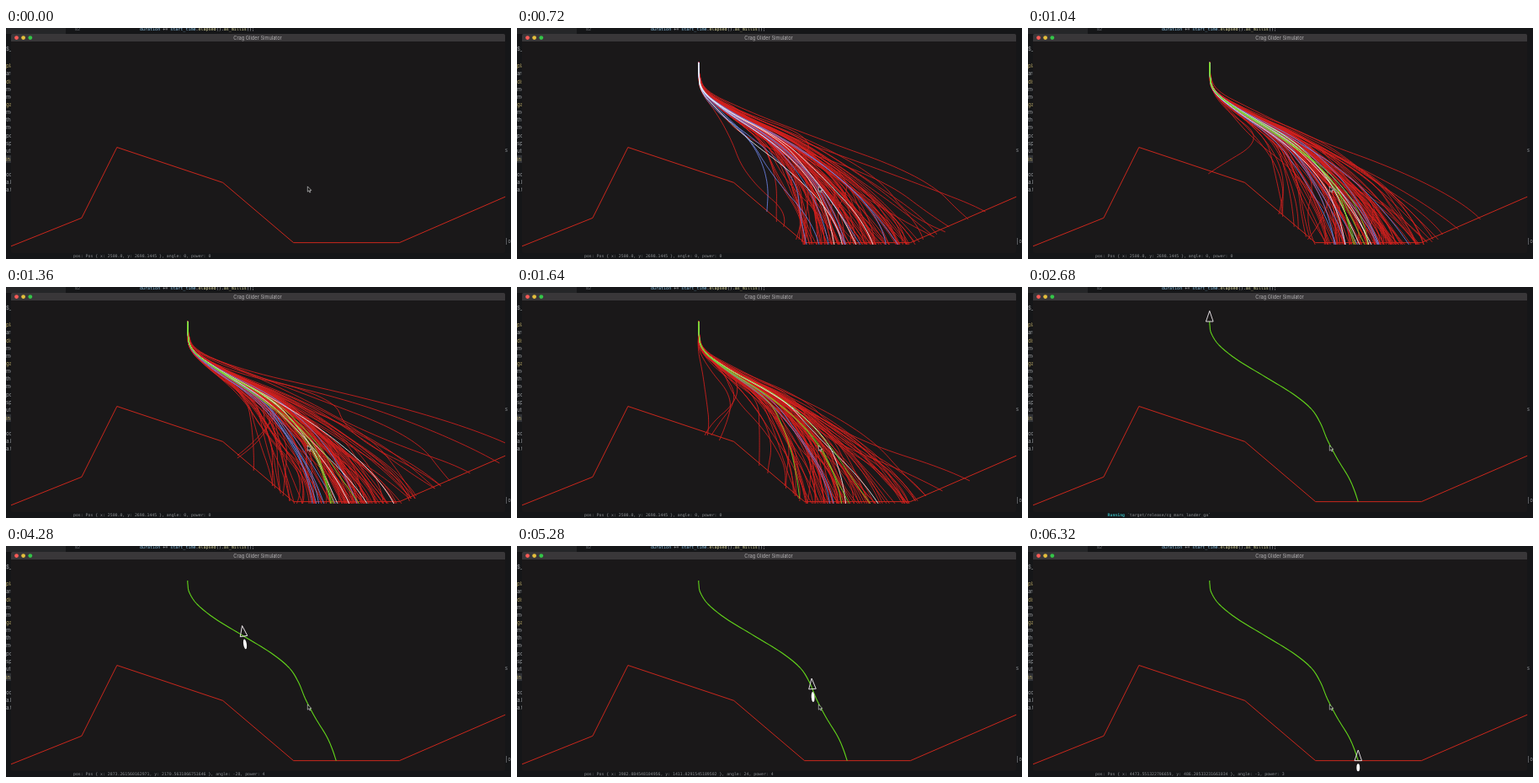
Animation of 600x274 px, one loop 6.36 s. Source, as an HTML page:

```html
<!DOCTYPE html>
<html lang="en">
<head>
<meta charset="utf-8">
<title>Crag Glider Simulator</title>
<style>
  html, body { margin: 0; width: 100%; height: 100%; overflow: hidden; background: #151618; }
  svg { display: block; width: 100vw; height: 100vh; }
  text { white-space: pre; }
  .mono { font-family: "DejaVu Sans Mono", "Liberation Mono", monospace; }
  .ui { font-family: Inter, "Liberation Sans", sans-serif; }
  .line { fill: none; stroke-linejoin: round; }
</style>
</head>
<body>
<svg viewBox="0 0 600 274" preserveAspectRatio="none">
  <rect width="600" height="274" fill="#151618"/>
  <rect width="71" height="7" fill="#252628"/>
  <g class="mono" font-size="5.02">
    <text x="82" y="3.4" fill="#70747a">82</text>
    <text x="159" y="3.4" fill="#c8ccd2"><tspan fill="#8fc7e8">duration</tspan> += <tspan fill="#8fc7e8">start_time</tspan>.<tspan fill="#d8d59a">elapsed</tspan>().<tspan fill="#d8d59a">as_millis</tspan>();</text>
  </g>
  <rect y="151" width="6" height="9" fill="#303236"/>
  <g id="sidebar" class="ui" font-size="6"></g>
  <g class="ui" font-size="5.5" fill="#9a9ca0">
    <text x="593" y="147">s</text>
    <text x="596.5" y="255">o</text>
  </g>
  <path d="M594.5 249v8" stroke="#77797d" stroke-width=".7"/>
  <rect x="6" y="7" width="587" height="260" rx="2" fill="#1a1819"/>
  <path d="M6 16V9q0-2 2-2H591q2 0 2 2V16z" fill="#393739"/>
  <circle cx="12.5" cy="11.6" r="2.4" fill="#fc5b57"/>
  <circle cx="20.6" cy="11.6" r="2.4" fill="#e5bf3c"/>
  <circle cx="28.8" cy="11.6" r="2.4" fill="#34c648"/>
  <text class="ui" x="299" y="13.7" font-size="5.7" text-anchor="middle" fill="#b6b4b6">Crag Glider Simulator</text>
  <path id="terrain" class="line" stroke="#cb271c"/>
  <g id="population" class="line" stroke-width=".85">
    <path stroke="#d3211e"/>
    <path stroke="#6d84e6"/>
    <path stroke="#f2f2f6"/>
    <path stroke="#74d824"/>
  </g>
  <path id="route" class="line" stroke="#62d51a" stroke-width="1.1"/>
  <g id="ship">
    <path d="M0-12.6L4.3 0H-4.3z" fill="none" stroke="#f4eef2" stroke-width=".9"/>
    <ellipse id="flame" rx="1.9" fill="#fff"/>
  </g>
  <path d="M358.3 187.9v6.3l1.5-1.3 1 2.2 1-.4-1-2.2h2z" fill="#111" stroke="#e6e6e6" stroke-width=".6"/>
  <text class="mono" x="80" y="271.8" font-size="4.85" fill="#8b8d90"><tspan id="verb" fill="#36b0b4" font-weight="bold"></tspan><tspan id="status"></tspan></text>
</svg>
<script>
const LOOP = 6360, STEP = 40, SEARCH_END = 2640, FLIGHT = 3160, LAST = 79;
const LOG_LAG = 8;
const $ = id => document.getElementById(id);
const lerp = (a, b, s) => a + (b - a) * s;
const clamp = (v, lo, hi) => Math.min(hi, Math.max(lo, v));
const px = x => 6 + x * 0.0839;
const py = y => 267.2 - y * 0.0838;

// Piecewise linear lookup in [key, value] pairs
function ramp(points, v) {
  if (v <= points[0][0]) return points[0][1];
  for (let i = 1; i < points.length; i++) {
    const [a, p] = points[i - 1], [b, q] = points[i];
    if (v <= b) return lerp(p, q, (v - a) / (b - a));
  }
  return points[points.length - 1][1];
}

const ground = [[0, 100], [1000, 500], [1500, 1500], [3000, 1000], [4000, 150], [5500, 150], [6999, 800]]
  .map(([x, y]) => [px(x), py(y)]);
$("terrain").setAttribute("d", "M" + ground.join("L"));

const labels = [[27, "$_i"], [47, "pla", 1], [56, "arg"], [66, "dis", 1], [75, "mo"], [84, "mo"], [93, "ga", 1],
  [102, "mo"], [111, "the"], [120, "mo"], [130, "po"], [139, "sp"], [148, "uti"], [158, "in", 1],
  [176, "oc"], [185, "a.lo"], [194, "a.to"]];
$("sidebar").innerHTML = labels.map(([y, s, hot]) =>
  `<text x="0" y="${y}" fill="${hot ? "#b9a765" : "#a0a2a6"}">${s}</text>`).join("");

// Flight plan: step, world x, world y, angle
const plan = [
  [0, 2500, 2700, 0], [5, 2503, 2646, -45], [10, 2524, 2532, -60], [15, 2634, 2365, -50],
  [20, 2873.261560162971, 2170.5631866751644, -28], [28, 3296, 1912, 9], [36, 3676, 1678, 25],
  [43, 3933, 1470, 28], [50, 4070, 1261, 15], [57, 4166, 1029, -10], [64, 4303, 766, -15],
  [71, 4473.551322706659, 486.20533231661034, -1], [75, 4547, 319, 4], [79, 4604, 150, 0]
];
const angles = plan.map(p => [p[0], p[3]]);

function tangent(i, axis) {
  const a = plan[Math.max(0, i - 1)], b = plan[Math.min(plan.length - 1, i + 1)];
  return (b[axis] - a[axis]) / (b[0] - a[0]);
}

function hermite(k, axis) {
  let i = 0;
  while (i < plan.length - 2 && k >= plan[i + 1][0]) i++;
  const a = plan[i], b = plan[i + 1], h = b[0] - a[0], s = (k - a[0]) / h;
  const w = s * s * (3 - 2 * s);
  return a[axis] * (1 - w) + b[axis] * w
    + h * s * (1 - s) * ((1 - s) * tangent(i, axis) - s * tangent(i + 1, axis));
}

const shipAt = k => ({
  x: hermite(k, 1),
  y: hermite(k, 2),
  angle: Math.round(ramp(angles, k)),
  power: k >= 68 ? 3 : Math.min(4, k)
});

const route = [];
for (let k = 0; k <= LAST; k++) {
  const p = shipAt(k);
  route.push(px(p.x).toFixed(2) + " " + py(p.y).toFixed(2));
}
$("route").setAttribute("d", "M" + route.join("L"));

function random(seed) {
  let s = Math.imul(seed + 1, 2654435761) >>> 0;
  return () => {
    s = (s + 0x6D2B79F5) >>> 0;
    let v = Math.imul(s ^ s >>> 15, 1 | s);
    v ^= v + Math.imul(v ^ v >>> 7, 61 | v);
    return ((v ^ v >>> 14) >>> 0) / 4294967296;
  };
}

// Sideways drift per unit of fall: depth, mean, sensitivity to noise
const drift = [[0, 0, 0], [.1, .12, .1], [.2, 1.35, .5], [.33, 1.75, 1], [.5, 1.1, 1.2], [.75, .7, 1.1], [1, .4, 1]];

function trajectory(seed, mean, spread) {
  const rnd = random(seed);
  const gauss = () => 2 * (rnd() + rnd() + rnd() - 1.5);
  const wide = rnd() < .08 ? spread * 3 : spread;
  const common = gauss();
  const slopes = drift.map(([u, m, w]) => [u, m * mean + w * wide * (.6 * common + .7 * gauss())]);
  let x = px(2500), y = py(2700), d = `M${x.toFixed(1)} ${y.toFixed(1)}`;
  const dy = 3;
  while (y < 257 && x > 6 && x < 593) {
    x = clamp(x + dy * ramp(slopes, (y - 41) / 214), 6, 593);
    y += dy;
    d += `L${x.toFixed(1)} ${y.toFixed(1)}`;
    if (y > ramp(ground, x) + 1) break;
  }
  return d;
}

const meanAt = [[1, .2], [5, .65], [12, 1], [34, 1.03], [49, .92], [65, .97]];
const spreadAt = [[1, .75], [8, .5], [18, .32], [34, .38], [49, .28], [65, .2]];
const sizeAt = [[1, 100], [36, 100], [49, 55], [65, 40]];
const groups = [...$("population").children];

function drawPopulation(gen) {
  const counts = [
    Math.round(ramp(sizeAt, gen)),
    gen < 6 ? 0 : Math.round(ramp([[6, 3], [18, 9], [34, 6], [44, 0]], gen)),
    gen < 10 ? 0 : Math.round(ramp([[10, 2], [18, 4], [34, 4], [46, 1]], gen)),
    gen < 25 ? 0 : 4
  ];
  groups.forEach((path, kind) => {
    let d = "";
    for (let i = 0; i < counts[kind]; i++) {
      // Individuals survive a few generations, better ones longer
      const life = kind ? 12 + i % 5 : 2 + i % 4;
      const birth = Math.max(1, gen - (gen + i * 7) % life);
      const spread = ramp(spreadAt, birth) * (kind ? .55 : 1);
      d += trajectory(birth * 997 + i * 13 + kind * 70001, ramp(meanAt, birth), spread);
    }
    path.setAttribute("d", d);
  });
}

const decimal = v => Number.isInteger(v) ? v.toFixed(1) : String(v);
const logLine = (x, y, angle, power) =>
  `pos: Pos { x: ${decimal(x)}, y: ${decimal(y)} }, angle: ${angle}, power: ${power}`;
const show = (id, on) => $(id).setAttribute("visibility", on ? "visible" : "hidden");

function drawShip(k) {
  const p = shipAt(k);
  $("ship").setAttribute("transform", `translate(${px(p.x)} ${py(p.y)}) rotate(${-p.angle})`);
  $("flame").setAttribute("cy", 3.5 + 1.5 * p.power);
  $("flame").setAttribute("ry", 1.5 * p.power);
}

function drawStatus(searching, k) {
  const logged = k - LOG_LAG;
  const running = !searching && logged < 1;
  $("verb").textContent = running ? "     Running" : "";
  if (running) {
    $("status").textContent = " `target/release/cg_mars_lander_ga`";
  } else if (searching) {
    $("status").textContent = logLine(2500, 2698.1445, 0, 0);
  } else {
    const p = shipAt(logged);
    $("status").textContent = logLine(p.x, p.y, p.angle, p.power);
  }
}

let shown = -1;
function render(time) {
  const frame = Math.floor(time % LOOP / STEP);
  if (frame === shown) return;
  shown = frame;
  const t = frame * STEP, searching = t < SEARCH_END;
  const k = clamp((t - FLIGHT) / STEP, 0, LAST);
  show("population", searching && frame > 0);
  show("route", !searching);
  show("ship", !searching);
  if (searching && frame > 0) drawPopulation(frame);
  drawShip(k);
  drawStatus(searching, k);
}

const start = performance.now();
function tick() {
  render(performance.now() - start);
  requestAnimationFrame(tick);
}
tick();
</script>
</body>
</html>
```
